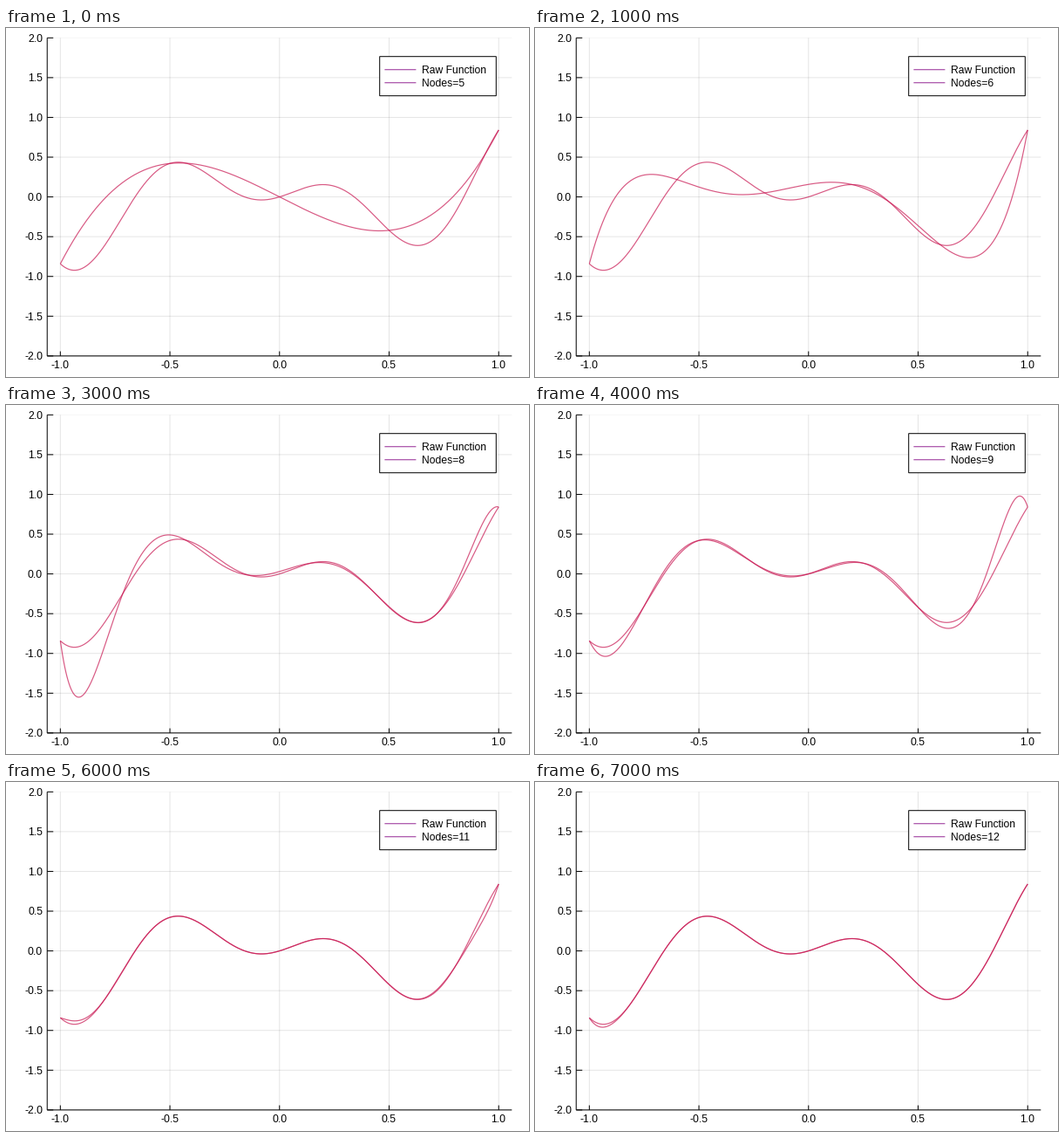
Recreate the animation shown at these times as a matplotlib script. Size 600x400 px, loop 8000 ms.

```python
import numpy as np
import matplotlib.pyplot as plt
from matplotlib.animation import FuncAnimation
from matplotlib.patches import Rectangle

W, H, DPI = 600, 400, 100
PX = 72 / DPI  # one pixel in points
MM = DPI / 25.4
LEFT, RIGHT = 12 * MM, W - 5 * MM
TOP, BOTTOM = 3 * MM - 0.5, H - 6 * MM - 0.5
X_LIM, Y_LIM = 1.06, 2
CURVE = (200 / 255, 20 / 255, 80 / 255, 0.7)
KEY = (0.5, 0, 0.5, 0.7)
FIRST_NODES, LAST_NODES = 5, 12

plt.rcParams["font.family"] = "Liberation Sans"

fig = plt.figure(figsize=(W / DPI, H / DPI), dpi=DPI, facecolor="white")
ax = fig.add_axes([0, 0, 1, 1])
ax.set_xlim(0, W)
ax.set_ylim(H, 0)
ax.axis("off")


def to_x(x):
    return (LEFT + RIGHT) / 2 + x * (RIGHT - LEFT) / (2 * X_LIM)


def to_y(y):
    return (TOP + BOTTOM) / 2 - y * (BOTTOM - TOP) / (2 * Y_LIM)


def raw(x):
    return x * np.sin(2 * np.pi * x + 1)


def interpolate(count, x):
    """Polynomial through equally spaced nodes, in Lagrange form."""
    nodes = np.linspace(-1, 1, count)
    total = np.zeros_like(x)
    for i, node in enumerate(nodes):
        others = np.delete(nodes, i)
        basis = np.prod((x[:, None] - others) / (node - others), axis=1)
        total += raw(node) * basis
    return total


def line(xs, ys, color, width=1.0, z=1):
    return ax.plot(xs, ys, color=color, lw=width * PX, zorder=z,
                   solid_capstyle="butt", snap=False)[0]


def label(x, y, text, ha, size=12.1):
    return ax.text(x, y, text, ha=ha, va="baseline", fontsize=size * PX,
                   color="black", zorder=6)


def draw_axes():
    grid = (0, 0, 0, 0.1)
    for v in np.linspace(-1, 1, 5):
        x = to_x(v)
        line([x, x], [TOP, BOTTOM], grid)
        line([x, x], [BOTTOM, BOTTOM - 5.3], "black", z=3)
        label(x - 0.2, 390.4, f"{v:.1f}", "center", 12.2)
    for v in np.linspace(-2, 2, 9):
        y = to_y(v)
        # the top grid line is half clipped by the plot area
        line([LEFT, RIGHT], [y, y], (0, 0, 0, 0.04) if v == Y_LIM else grid)
        line([LEFT, LEFT + 7], [y, y], "black", z=3)
        label(42, y + 4.2, f"{v:.1f}", "right", 12.2)
    line([LEFT, LEFT], [TOP, BOTTOM], "black", z=3)
    line([LEFT, RIGHT], [BOTTOM, BOTTOM], "black", z=3)


def draw_legend():
    ax.add_patch(Rectangle((428.7, 32.7), 133.6, 45, facecolor="white",
                           edgecolor="black", lw=PX, zorder=5, snap=False))
    for y in (47.7, 62.7):
        line([434.4, 470.4], [y, y], KEY, 1.2, 6)
    label(477.2, 52, "Raw Function", "left")
    return label(477.2, 67, "", "left")


draw_axes()
node_text = draw_legend()
t = np.linspace(-1, 1, 401)
line(to_x(t), to_y(raw(t)), CURVE, 1.2, 4)
fit = line(to_x(t), to_y(raw(t)), CURVE, 1.2, 4)


def update(i):
    count = FIRST_NODES + i
    fit.set_ydata(to_y(interpolate(count, t)))
    node_text.set_text(f"Nodes={count}")
    return fit, node_text


anim = FuncAnimation(fig, update, frames=LAST_NODES - FIRST_NODES + 1,
                     interval=1000, repeat=True, repeat_delay=0, blit=False)
plt.show()
```
